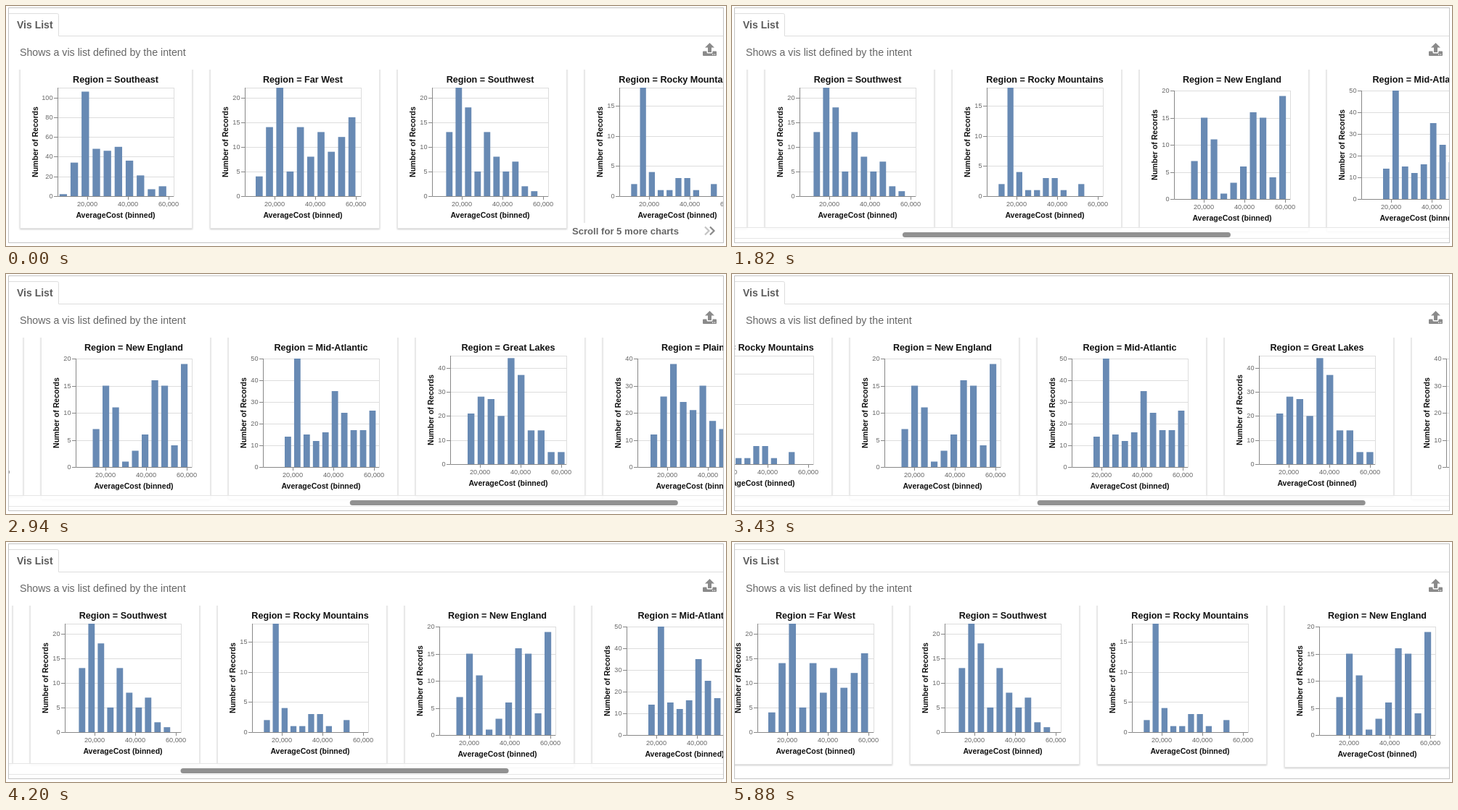
Recreate the animation shown at these times as an HTML page. Size 992 by 332 pixels, loop 5950 ms.

```html
<!DOCTYPE html>
<html lang="en">
<head>
<meta charset="utf-8">
<title>Vis List</title>
<style>
html, body { margin: 0; width: 100%; height: 100%; overflow: hidden; background: #fff; }
svg { display: block; font-family: "Liberation Sans", Arial, sans-serif; }
.line { stroke: #ddd; fill: none; }
.axis { stroke: #888; fill: none; }
.bar { fill: #688ab4; }
.label { font-size: 9.2px; fill: #666; }
.title { font-size: 12.6px; font-weight: bold; fill: #111; text-anchor: middle; }
.name { font-size: 10.55px; font-weight: bold; fill: #111; text-anchor: middle; }
.mid { text-anchor: middle; }
.end { text-anchor: end; }
.card { fill: #fff; stroke: #e6e6e6; filter: drop-shadow(0 1px 1px rgba(0, 0, 0, .22)); }
.head { font-size: 14px; font-weight: bold; fill: #5c5c5c; }
.intro { font-size: 14.2px; fill: #666; }
.more { font-size: 13.1px; font-weight: bold; fill: #666; }
</style>
</head>
<body>
<svg id="stage" width="992" height="332" viewBox="0 0 992 332">
  <clipPath id="view"><rect x="4" y="88" width="984" height="234"/></clipPath>
  <rect x="3.5" y="2.5" width="985" height="325" fill="#fff" stroke="#c4c4c4"/>
  <path class="line" d="M4 10.5H70.5Q72.5 10.5 72.5 12.5V41.5H988"/>
  <text class="head" x="15" y="31" textLength="">Vis List</text>
  <text class="intro" x="19" y="69">Shows a vis list defined by the intent</text>
  <g fill="#8a8a8a">
    <path d="M969.5 51L976 57.6H972V64H967V57.6H963Z"/>
    <path d="M961 62.5H965.5V64Q965.5 65.6 967 65.6H972Q973.5 65.6 973.5 64V62.5H978Q979 62.5 979 63.5V68Q979 69 978 69H961Q960 69 960 68V63.5Q960 62.5 961 62.5Z"/>
    <path fill="#fff" d="M973 66.6h1.4v1.2h-1.4zM975.8 66.6h1.4v1.2h-1.4z"/>
  </g>
  <g clip-path="url(#view)">
    <g id="cards"></g>
    <g id="more">
      <rect x="776" y="300" width="212" height="22" fill="#fff"/>
      <text class="more" x="780" y="315.5">Scroll for 5 more charts</text>
      <g fill="none" stroke-width="2.2">
        <path stroke="#c4c4c4" d="M963 305.5L968.5 311L963 316.5"/>
        <path stroke="#8a8a8a" d="M970 305.5L975.5 311L970 316.5"/>
      </g>
    </g>
    <g id="bar">
      <rect x="4" y="307" width="984" height="15" fill="#fff" fill-opacity=".9"/>
      <path stroke="#e6e6e6" d="M4 306.5H988M4 321.5H988"/>
      <rect id="thumb" y="313" width="452" height="7" rx="3.5" fill="#919191"/>
    </g>
  </g>
</svg>
<script>
const NS = "http://www.w3.org/2000/svg";
const $ = id => document.getElementById(id);
const PITCH = 258, STEP = 70, LOOP = 5950;

// name, y maximum, y tick step, first bar offset, bar pitch, counts
const charts = [
  ["Southeast", 110, 20, 2.7, 15.2, [2, 34, 106, 48, 46, 50, 36, 21, 7, 10]],
  ["Far West", 22, 5, 15, 14.2, [4, 14, 22, 5, 14, 8, 13, 9, 12, 16]],
  ["Southwest", 22, 5, 19.4, 13, [13, 22, 18, 5, 13, 8, 5, 7, 2, 1]],
  ["Rocky Mountains", 18, 5, 16.3, 12.2, [2, 18, 4, 1, 1, 3, 3, 1, 0, 2]],
  ["New England", 20, 5, 23.5, 13.5, [7, 15, 11, 1, 3, 6, 16, 15, 4, 19]],
  ["Mid-Atlantic", 50, 10, 30, 12.95, [14, 50, 15, 12, 16, 35, 25, 17, 17, 26]],
  ["Great Lakes", 45, 10, 24, 13.8, [21, 28, 27, 20, 44, 37, 14, 14, 5, 5]],
  ["Plains", 40, 10, 18, 13.5, [12, 26, 38, 24, 21, 30, 17, 14, 8, 6]]
];

function add(parent, tag, attrs, text) {
  const el = document.createElementNS(NS, tag);
  for (const key in attrs) el.setAttribute(key, attrs[key]);
  if (text !== undefined) el.textContent = text;
  return parent.appendChild(el);
}

function drawChart([name, max, step, first, pitch, counts], i) {
  const g = add($("cards"), "g", { transform: `translate(${71 + i * PITCH} 0)` });
  const top = max % step || max > 100 ? 113 : 117;
  const base = top + 150;
  const y = v => base - v / max * 150;
  const left = i ? -47.5 : -51.5;

  add(g, "rect", { class: "card", x: left, y: 70, width: 186 - left - .5, height: base - 25.5 });
  add(g, "text", { class: "title", x: 80, y: 105.8 }, "Region = " + name);
  add(g, "rect", { class: "line", x: .5, y: top + .5, width: 160, height: 150 });

  for (let v = 0; v <= max; v += step) {
    const row = Math.round(y(v)) + .5;
    add(g, "path", { class: "line", d: `M0 ${row}H160` });
    add(g, "path", { class: "axis", d: `M-5 ${row}H0` });
    add(g, "text", { class: "label end", x: -6.5, y: row + 2.8 }, v);
  }
  counts.forEach((n, k) => add(g, "rect", {
    class: "bar", x: first + k * pitch, y: y(n), width: pitch * .68, height: base - y(n)
  }));
  add(g, "path", { class: "axis", d: `M.5 ${top}V${base + .5}H160` });
  for (let k = 0; k < 3; k++) {
    const x = 41 + 56 * k;
    add(g, "path", { class: "axis", d: `M${x + .5} ${base}v5` });
    add(g, "text", { class: "label mid", x, y: base + 14.3 }, `${20 * (k + 1)},000`);
  }
  add(g, "text", { class: "name", x: 80, y: base + 29.5 }, "AverageCost (binned)");
  add(g, "text", {
    class: "name", transform: `translate(${i ? -23 : -27.5} ${base - 75}) rotate(-90)`
  }, "Number of Records");
}
charts.forEach(drawChart);

// Scroll offset over time, joined by a monotone cubic
const path = [
  [0, 0], [1050, 0], [1260, 81], [1820, 494], [2380, 863], [2730, 1010],
  [2870, 1010], [3430, 893], [4200, 506], [4900, 294], [LOOP, 294]
];
const slope = i => (path[i + 1][1] - path[i][1]) / (path[i + 1][0] - path[i][0]);
function tangent(i) {
  if (i === 0 || i === path.length - 1) return 0;
  const a = slope(i - 1), b = slope(i);
  return a * b > 0 ? 2 * a * b / (a + b) : 0;
}
function offset(t) {
  let i = 0;
  while (i < path.length - 2 && t >= path[i + 1][0]) i++;
  const [t0, p0] = path[i], [t1, p1] = path[i + 1];
  const h = t1 - t0, u = (t - t0) / h, w = 1 - u;
  return w * w * (1 + 2 * u) * p0 + u * u * (3 - 2 * u) * p1
    + h * u * w * (w * tangent(i) - u * tangent(i + 1));
}

function draw(now) {
  const t = Math.floor(now % LOOP / STEP) * STEP;
  const s = Math.round(offset(t));
  const fade = Math.min(1, Math.max(0, (5460 - t) / 210));
  $("cards").setAttribute("transform", `translate(${-s} 0)`);
  $("thumb").setAttribute("x", 5 + s * .4655);
  $("more").style.display = t < 1120 ? "" : "none";
  $("bar").style.opacity = t < 1120 ? 0 : fade;
}

const start = performance.now();
function tick() {
  draw(performance.now() - start);
  requestAnimationFrame(tick);
}
tick();
</script>
</body>
</html>
```
